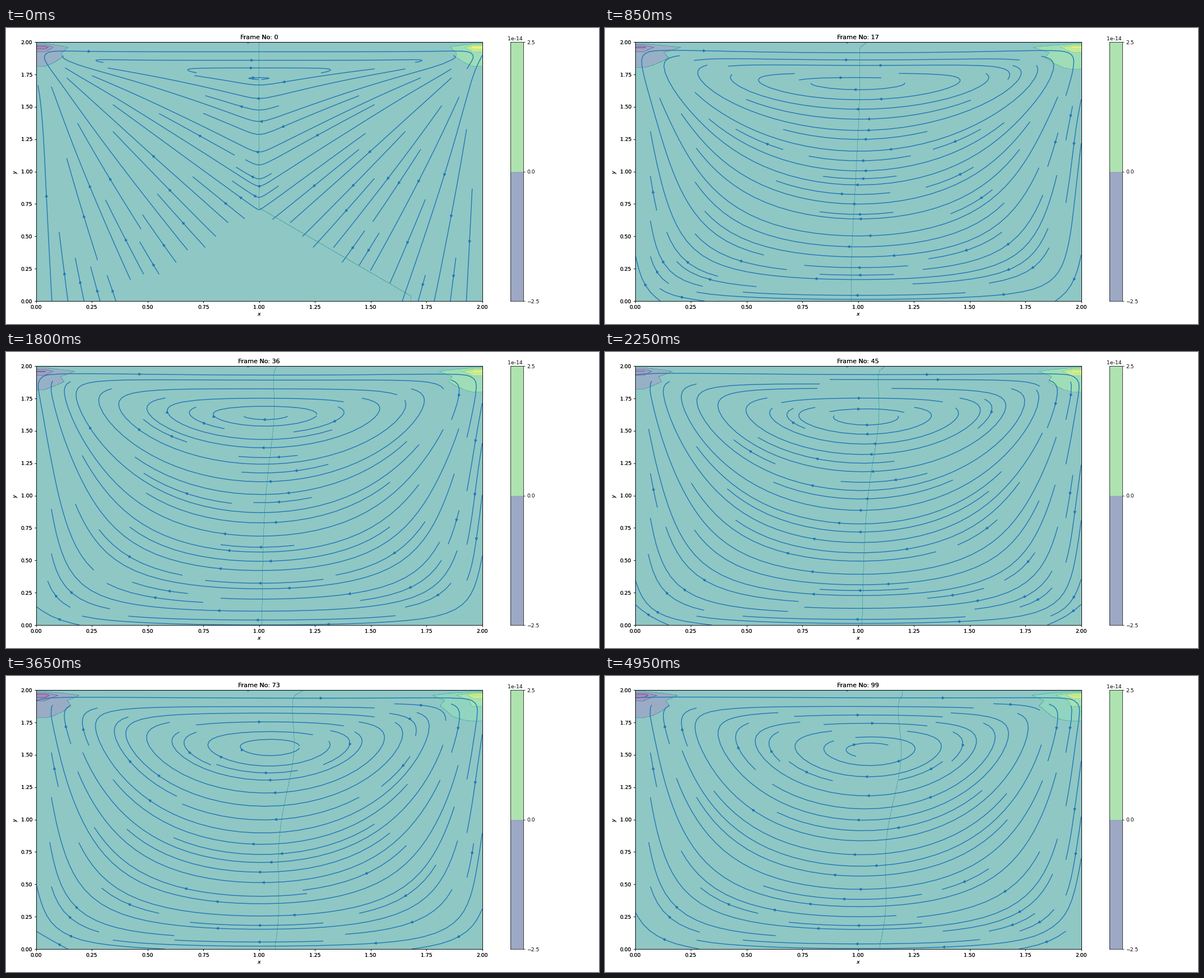
These frames come from a looping animation (1058 px wide and 529 px high, 5 s). A matplotlib script:

```python
import math

import matplotlib.pyplot as plt
import numpy as np
from matplotlib.animation import FuncAnimation
from matplotlib.collections import LineCollection, PolyCollection
from matplotlib.ticker import MaxNLocator

WIDTH, HEIGHT, DPI = 1058, 529, 72
FRAMES, INTERVAL = 100, 50
LEFT, RIGHT, TOP, BOTTOM = 53.5, 849.7, 25.2, 488.0

# Lid-driven cavity
N, SIZE = 51, 2.0
H = SIZE / (N - 1)
RHO, NU, DT = 1.0, 0.1, 0.001
STEPS, SWEEPS = 10, 6

# Streamline tracing
CELLS = 30
MAX_DS, MAX_ERROR = 1 / CELLS, 0.003
MIN_LENGTH, MAX_LENGTH = 0.1, 2.0
LINE_COLOR, LINE_WIDTH = "#1f77b4", 1.4


def mid(a):
    return a[1:-1, 1:-1]


def east(a):
    return a[1:-1, 2:]


def west(a):
    return a[1:-1, :-2]


def north(a):
    return a[2:, 1:-1]


def south(a):
    return a[:-2, 1:-1]


def solve_pressure(p, u, v):
    ux, uy = (east(u) - west(u)) / (2 * H), (north(u) - south(u)) / (2 * H)
    vx, vy = (east(v) - west(v)) / (2 * H), (north(v) - south(v)) / (2 * H)
    source = RHO * ((ux + vy) / DT - ux**2 - 2 * uy * vx - vy**2)
    for _ in range(SWEEPS):
        p[1:-1, 1:-1] = (east(p) + west(p) + north(p) + south(p) - H**2 * source) / 4
        p[:, -1] = p[:, -2]
        p[0] = p[1]
        p[:, 0] = p[:, 1]
        p[-1] = 0


def advance(w, u, v, slope):
    c = mid(w)
    advection = mid(u) * (c - west(w)) + mid(v) * (c - south(w))
    diffusion = east(w) + west(w) + north(w) + south(w) - 4 * c
    out = np.zeros_like(w)
    out[1:-1, 1:-1] = (c - DT / H * advection - DT / (2 * RHO * H) * slope
                       + NU * DT / H**2 * diffusion)
    return out


def simulate():
    u, v, p = np.zeros((3, N, N))
    states = []
    for _ in range(FRAMES):
        for _ in range(STEPS):
            solve_pressure(p, u, v)
            u, v = (advance(u, u, v, east(p) - west(p)),
                    advance(v, u, v, north(p) - south(p)))
            u[-1] = 1
        states.append((u.copy(), v.copy(), p.copy()))
    return states


def spiral(n):
    """Cells of an n by n grid, from the border inwards."""
    x = y = x_first = 0
    y_first, x_last, y_last = 1, n - 1, n - 1
    heading = "right"
    for _ in range(n * n):
        yield x, y
        if heading == "right":
            x += 1
            if x >= x_last:
                x_last -= 1
                heading = "up"
        elif heading == "up":
            y += 1
            if y >= y_last:
                y_last -= 1
                heading = "left"
        elif heading == "left":
            x -= 1
            if x <= x_first:
                x_first += 1
                heading = "down"
        else:
            y -= 1
            if y <= y_first:
                y_first += 1
                heading = "right"


class Tracer:
    """Evenly spread streamlines: each mask cell takes one line."""

    last = N - 1
    to_cell = (CELLS - 1) / (N - 1)

    def __init__(self, u, v):
        self.u, self.v = (u / H).tolist(), (v / H).tolist()
        self.speed = (np.hypot(u, v) / H / self.last).tolist()
        self.taken = set()
        self.current = None
        self.path = []

    def inside(self, x, y):
        return 0 <= x <= self.last and 0 <= y <= self.last

    def cell(self, x, y):
        return round(x * self.to_cell), round(y * self.to_cell)

    def claim(self, cell):
        if cell != self.current:
            if cell in self.taken:
                return False
            self.taken.add(cell)
            self.path.append(cell)
            self.current = cell
        return True

    def direction(self, x, y, sign):
        i, j = int(x), int(y)
        i2, j2 = min(i + 1, self.last), min(j + 1, self.last)
        s, t = x - i, y - j
        w00, w01 = (1 - s) * (1 - t), s * (1 - t)
        w10, w11 = (1 - s) * t, s * t

        def sample(a):
            lo, hi = a[j], a[j2]
            return lo[i] * w00 + lo[i2] * w01 + hi[i] * w10 + hi[i2] * w11

        speed = sample(self.speed)
        if speed == 0:
            return None
        return sign * sample(self.u) / speed, sign * sample(self.v) / speed

    def to_border(self, x, y, kx, ky):
        def reach(pos, k):
            if k == 0:
                return math.inf
            return pos / -k if k < 0 else (self.last - pos) / k

        ds = min(reach(x, kx), reach(y, ky))
        return ds, (x + kx * ds, y + ky * ds)

    def march(self, x, y, sign):
        ds, total, points = MAX_DS, 0.0, []
        while True:
            points.append((x, y))
            k1 = self.direction(x, y, sign)
            if k1 is None:
                break
            ax_, ay_ = x + ds * k1[0], y + ds * k1[1]
            if not self.inside(ax_, ay_):
                extra, end = self.to_border(x, y, *k1)
                points.append(end)
                total += extra
                break
            k2 = self.direction(ax_, ay_, sign)
            if k2 is None:
                break
            ex, ey = ds * (k2[0] - k1[0]) / 2, ds * (k2[1] - k1[1]) / 2
            error = math.hypot(ex, ey) / self.last
            if error < MAX_ERROR:
                x += ds * (k1[0] + k2[0]) / 2
                y += ds * (k1[1] + k2[1]) / 2
                if not self.inside(x, y) or not self.claim(self.cell(x, y)):
                    break
                if total + ds > MAX_LENGTH:
                    break
                total += ds
            else:
                points.pop()
            ds = MAX_DS if error == 0 else min(
                MAX_DS, 0.85 * ds * math.sqrt(MAX_ERROR / error))
        return total, points

    def trace(self, x, y):
        self.path = []
        if not self.claim(self.cell(x, y)):
            return None
        back, before = self.march(x, y, -1)
        self.current = self.cell(x, y)
        ahead, after = self.march(x, y, 1)
        if back + ahead > MIN_LENGTH:
            return np.array(before[::-1] + after[1:]) * H
        self.taken.difference_update(self.path)
        return None

    def lines(self):
        found = []
        for cell in spiral(CELLS):
            if cell not in self.taken:
                line = self.trace(cell[0] / self.to_cell, cell[1] / self.to_cell)
                if line is not None:
                    found.append(line)
        return found


PX = np.array([RIGHT - LEFT, BOTTOM - TOP]) / SIZE


def arrow_head(line):
    """Triangle halfway along a line, sized in pixels."""
    length = np.cumsum(np.hypot(*np.diff(line, axis=0).T))
    n = np.searchsorted(length, length[-1] / 2)
    tail, head = line[n] * PX, line[n:n + 2].mean(axis=0) * PX
    dist = math.hypot(*(head - tail))
    if dist == 0:
        return None
    along = (head - tail) / dist
    across = np.array([-along[1], along[0]])
    scale = LINE_WIDTH / 1.5
    tip = head - along * scale * (1.68 + (2 if dist > 4 * scale else 0))
    base = tip - along * 4 * scale
    wing = across * 2 * scale
    return np.array([base + wing, tip, base - wing]) / PX


plt.rcParams.update({
    "font.family": "DejaVu Sans",
    "font.size": 9.3,
    "axes.titlesize": 11.1,
    "axes.titlepad": 5.6,
    "axes.labelpad": 3.7,
    "axes.linewidth": 0.75,
    "xtick.major.size": 3.25, "ytick.major.size": 3.25,
    "xtick.major.pad": 3.25, "ytick.major.pad": 3.25,
    "xtick.major.width": 0.75, "ytick.major.width": 0.75,
})
viridis = plt.get_cmap("viridis")
fig = plt.figure(figsize=((WIDTH + 1e-6) / DPI, (HEIGHT + 1e-6) / DPI), dpi=DPI,
                 facecolor="white")


def add_axes(left, right, **kw):
    return fig.add_axes([left / WIDTH, 1 - BOTTOM / HEIGHT,
                         (right - left) / WIDTH, (BOTTOM - TOP) / HEIGHT], **kw)


# Two stacked axes give the heavy look of the labels.
layers = [add_axes(LEFT, RIGHT, facecolor="none") for _ in range(2)]
for layer in layers:
    layer.set(xlim=(0, SIZE), ylim=(0, SIZE), xlabel="$x$", ylabel="$y$")
ax = layers[0]

bar = add_axes(899.5, 922.6)
bar.set(xlim=(0, 1), ylim=(-2.5, 2.5), xticks=[])
bar.yaxis.tick_right()
bar.set_yticks([-2.5, 0, 2.5], ["\u22122.5", "0.0", "2.5"])
bar.axhspan(-2.5, 0, color=viridis(0.25), alpha=0.5, lw=0)
bar.axhspan(0, 2.5, color=viridis(0.75), alpha=0.5, lw=0)
fig.text(921.5 / WIDTH, 1 - 22.3 / HEIGHT, "1e\u221214".replace("\u2212", "-"), ha="right")

grid = np.linspace(0, SIZE, N)
states = simulate()


def draw_pressure(p):
    low, high = p.min(), p.max()
    levels = MaxNLocator(8, min_n_ticks=1).tick_values(low, high)
    first = max(np.searchsorted(levels, low) - 1, 0)
    levels = levels[first:np.searchsorted(levels, high, side="right") + 1]
    centers = (levels[:-1] + levels[1:]) / 2
    step = levels[1] - levels[0]
    # Both bands next to zero share the middle colour.
    shades = [0.5 if abs(c) < 0.6 * step else (c - levels[0]) / (levels[-1] - levels[0])
              for c in centers]
    ax.contourf(grid, grid, p, levels=levels, colors=[viridis(s) for s in shades],
                alpha=0.5)


def draw_flow(u, v):
    lines = Tracer(u, v).lines()
    heads = [h for h in map(arrow_head, lines) if h is not None]
    ax.add_collection(LineCollection(lines, colors=LINE_COLOR, linewidths=LINE_WIDTH,
                                     zorder=2), autolim=False)
    ax.add_collection(PolyCollection(heads, facecolors=LINE_COLOR, edgecolors=LINE_COLOR,
                                     linewidths=LINE_WIDTH, joinstyle="round",
                                     zorder=2), autolim=False)


def update(frame):
    for artist in list(ax.collections):
        artist.remove()
    u, v, p = states[frame]
    draw_pressure(p)
    draw_flow(u, v)
    for layer in layers:
        layer.set_title(f"Frame No: {frame}")
    return []


anim = FuncAnimation(fig, update, frames=FRAMES, interval=INTERVAL,
                     init_func=lambda: [], repeat=True, repeat_delay=0, blit=False)
plt.show()
```
